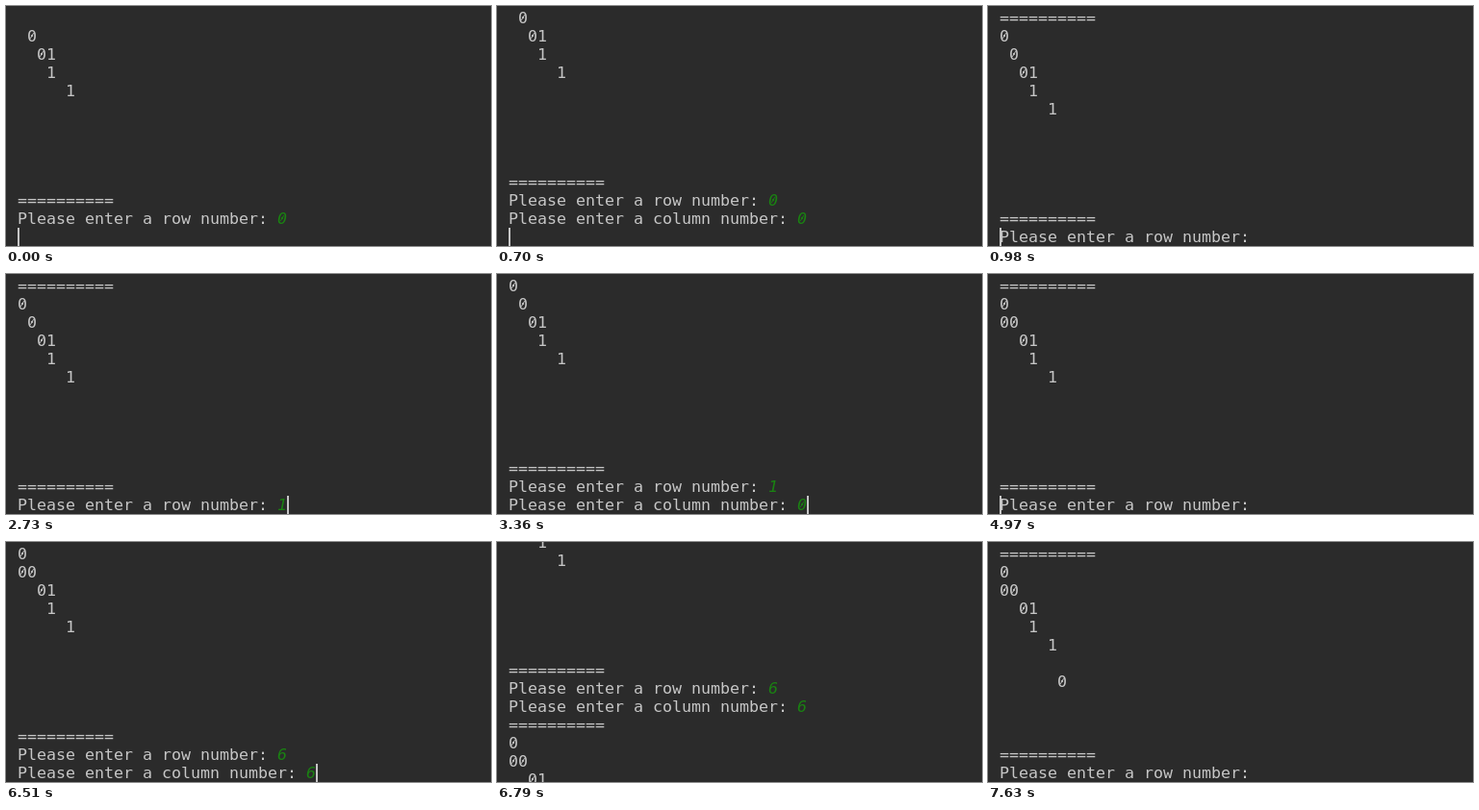
An HTML page with a canvas that plays this animation: 504 by 250 pixels, repeating every 8000 ms.

```html
<!DOCTYPE html>
<html lang="en">
<head>
<meta charset="utf-8">
<style>
html, body { margin: 0; width: 100%; height: 100%; overflow: hidden; background: #2b2b2b; }
canvas { display: block; }
</style>
</head>
<body>
<canvas id="stage" width="504" height="250"></canvas>
<script>
const ctx = document.getElementById('stage').getContext('2d');
const LOOP = 8000, STEP = 70, LEFT = 12, TOP = 3, CHAR = 10, LINE = 19, BLOCK = 14;
const FONT = '16.61px "DejaVu Sans Mono", monospace';
const TEXT = '#c6c6c6', INPUT = '#1a8212', BACK = '#2b2b2b';
const RULE = '='.repeat(10);
const ASK_ROW = 'Please enter a row number: ', ASK_COL = 'Please enter a column number: ';

// times: row typed, row entered, column asked, column typed, column entered, board printed
// scroll: pixels moved at each step after the board is printed
const rounds = [
  { row: 0, col: 0, times: [-2, -1, 140, 350, 700, 910], scroll: [114, 228] },
  { row: 1, col: 0, times: [2730, 2870, 3080, 3360, 3500, 3640], scroll: [0, 50, 178, 228] },
  { row: 6, col: 6, times: [6020, 6230, 6440, 6510, 6580, 6720], scroll: [0, 50, 178, 228] }
];
const blinkOff = [[1820, 2310], [4410, 4970], [5530, 6020], [7630, LOOP]];

// boards[i] is the board before round i
const boards = [['', ' 0', '  01', '   1', '     1', '', '', '', '', '']];
for (const { row, col } of rounds) {
  const next = boards.at(-1).slice();
  const cells = next[row].padEnd(col + 1).split('');
  cells[col] = '0';
  next[row] = cells.join('');
  boards.push(next);
}

function state(t) {
  let scroll = 0, line = 12, col = 0, printed = 0;
  const phases = rounds.map(({ times, scroll: steps }, i) => {
    const n = times.filter(time => time <= t).length;
    if (!n) return 0;
    const asked = t >= times[2] + STEP ? ASK_COL.length : 0;
    const first = i * BLOCK;
    line = first + [12, 12, 13, 13, 13, 14, 26][n];
    col = [0, 28, 0, asked, 31, 0, 0][n];
    scroll = first * LINE + (n >= 5 ? 2 : n >= 2 ? 1 : 0) * LINE;
    if (n === 6) {
      const k = Math.floor((t - times[5]) / STEP);
      scroll += steps[Math.min(k, steps.length - 1)];
      printed = i + 1;
    }
    return n;
  });
  return { scroll, line, col, printed, phases };
}

function write(text, line, scroll, col = 0, typed = false) {
  const y = TOP + LINE * line - scroll + 15;
  if (y < -LINE || y > 250 + LINE) return;
  const x = LEFT + col * CHAR;
  ctx.font = (typed ? 'italic ' : '') + FONT;
  ctx.fillStyle = ctx.strokeStyle = typed ? INPUT : TEXT;
  ctx.fillText(text, x, y);
  // slashed zeros
  ctx.beginPath();
  [...text].forEach((c, i) => {
    if (c !== '0') return;
    ctx.moveTo(x + i * CHAR + 3.4, y - 3.2);
    ctx.lineTo(x + i * CHAR + 6.6, y - 8.8);
  });
  ctx.stroke();
}

function draw(t) {
  const { scroll, line, col, printed, phases } = state(t);
  ctx.fillStyle = BACK;
  ctx.fillRect(0, 0, 504, 250);
  for (let i = 0; i <= printed; i++) {
    const first = i * BLOCK, phase = phases[i] || 0;
    [RULE, ...boards[i], RULE, ASK_ROW].forEach((s, k) => write(s, first + k, scroll));
    if (phase >= 1) write(String(rounds[i].row), first + 12, scroll, ASK_ROW.length, true);
    if (phase >= 3) write(ASK_COL, first + 13, scroll);
    if (phase >= 4) write(String(rounds[i].col), first + 13, scroll, ASK_COL.length, true);
  }
  if (!blinkOff.some(([a, b]) => t >= a && t < b)) {
    ctx.fillStyle = TEXT;
    ctx.fillRect(LEFT + col * CHAR, TOP + LINE * line - scroll, 2, LINE);
  }
}

const start = performance.now();
function tick() {
  draw((performance.now() - start) % LOOP);
  requestAnimationFrame(tick);
}
tick();
</script>
</body>
</html>
```
